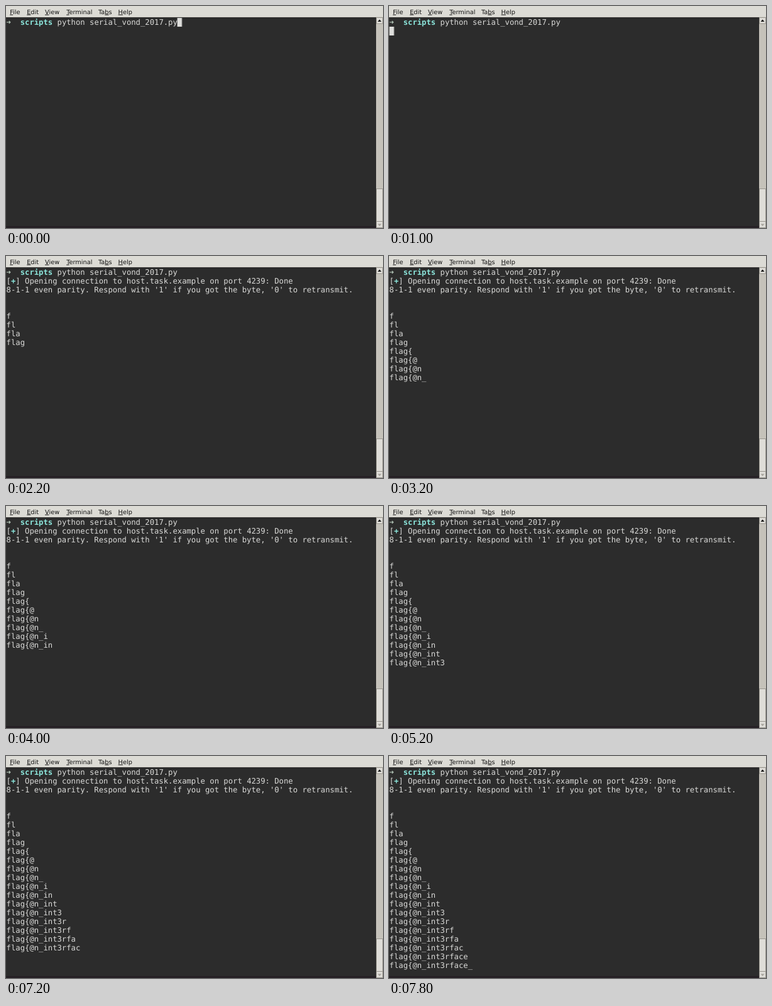
An HTML page that plays this animation: 600 by 354 pixels, repeating every 8 s.

```html
<!DOCTYPE html>
<html lang="en">
<head>
<meta charset="utf-8">
<title>Terminal</title>
<style>
  html, body { margin: 0; width: 100%; height: 100%; overflow: hidden; background: #2c2c2c; }
  svg { display: block; width: 600px; height: 354px; }
  text { white-space: pre; text-rendering: geometricPrecision; }
  .menu { font: 9.75px "DejaVu Sans", sans-serif; fill: #111; }
  .u { text-decoration: underline; }
  .term { font: 12.225px "DejaVu Sans Mono", monospace; fill: #dadad8; }
  .bold { font-weight: bold; }
  .cyan { fill: #8ce6dc; }
  .blue { fill: #7fa8d8; }

  #cursor, #trying, #done, #cover { animation: 8s step-end infinite; }
  #cursor { animation-name: cursor; }
  #trying { animation-name: trying; }
  #done { animation-name: done; }
  #cover { animation-name: reveal; }

  @keyframes cursor {
    0% { transform: translate(272.6px, 0); opacity: 1; }
    12.5% { transform: translate(0.6px, 14px); opacity: 1; }
    15%, 100% { transform: translate(0.6px, 14px); opacity: 0; }
  }
  @keyframes trying {
    0% { opacity: 0; }
    15% { opacity: 1; }
    17.5%, 100% { opacity: 0; }
  }
  @keyframes done {
    0% { opacity: 0; }
    17.5%, 100% { opacity: 1; }
  }
  /* The cover slides down one 14px row for each printed line. */
  @keyframes reveal {
    0% { transform: translateY(0); }
    17.5% { transform: translateY(14px); }
    25% { transform: translateY(42px); }
    27.5% { transform: translateY(56px); }
    35% { transform: translateY(70px); }
    37.5% { transform: translateY(98px); }
    40% { transform: translateY(112px); }
    45% { transform: translateY(126px); }
    50% { transform: translateY(140px); }
    55% { transform: translateY(154px); }
    65% { transform: translateY(168px); }
    72.5% { transform: translateY(182px); }
    75% { transform: translateY(196px); }
    80% { transform: translateY(210px); }
    90% { transform: translateY(224px); }
    95% { transform: translateY(238px); }
    97.5%, 100% { transform: translateY(252px); }
  }
</style>
</head>
<body>
<svg viewBox="0 0 600 354">
  <rect width="600" height="354" fill="#2c2c2c"/>

  <g class="term">
    <text x="0.6" y="30" fill="#b9cbbd" class="bold">➜</text>
    <text x="22.7" y="30"><tspan class="bold cyan">scripts</tspan> python serial_vond_2017.py</text>
    <rect id="cursor" y="19" width="7.4" height="14" fill="#dededc"/>
    <text id="trying" x="0.6" y="44">[<tspan class="bold blue">|</tspan>] Opening connection to host.task.example on port 4239: Trying 203.0.113.17</text>
    <g id="done">
      <text x="0.6" y="44">[<tspan class="bold cyan">+</tspan>] Opening connection to host.task.example on port 4239: Done</text>
      <text x="0.6" y="58">8-1-1 even parity. Respond with '1' if you got the byte, '0' to retransmit.</text>
    </g>
    <g id="lines"></g>
  </g>
  <rect id="cover" y="89" width="589" height="265" fill="#2c2c2c"/>
  <rect y="351" width="589" height="3" fill="#251f24"/>

  <!-- menu bar -->
  <rect width="600" height="18" fill="#dcdbd5"/>
  <rect y="17" width="600" height="1" fill="#cfcdc6"/>
  <g class="menu">
    <text x="6.2" y="12.6"><tspan class="u">F</tspan>ile</text>
    <text x="33.2" y="12.6"><tspan class="u">E</tspan>dit</text>
    <text x="62" y="12.6"><tspan class="u">V</tspan>iew</text>
    <text x="96.2" y="12.6"><tspan class="u">T</tspan>erminal</text>
    <text x="147" y="12.6">Ta<tspan class="u">b</tspan>s</text>
    <text x="178.6" y="12.6"><tspan class="u">H</tspan>elp</text>
  </g>

  <!-- scroll bar -->
  <rect x="589" y="18" width="11" height="336" fill="#c5c2ba"/>
  <g fill="#dfddd8" stroke="#98958d" stroke-width="1">
    <rect x="589.5" y="18.5" width="10" height="9.5"/>
    <rect x="589.5" y="291.5" width="10" height="52"/>
    <rect x="589.5" y="343.5" width="10" height="10"/>
  </g>
  <path d="M591.5 25 L594.5 21.5 L597.5 25 Z" fill="#111"/>
  <path d="M591.5 347.5 L594.5 351 L597.5 347.5 Z" fill="#a5a29a"/>
</svg>
<script>
  const flag = 'flag{@n_int3rface_';
  const lines = document.getElementById('lines');
  for (let n = 1; n <= flag.length; n++) {
    const line = document.createElementNS('http://www.w3.org/2000/svg', 'text');
    line.setAttribute('x', 0.6);
    line.setAttribute('y', 86 + 14 * n);
    line.textContent = flag.slice(0, n);
    lines.append(line);
  }
</script>
</body>
</html>
```
